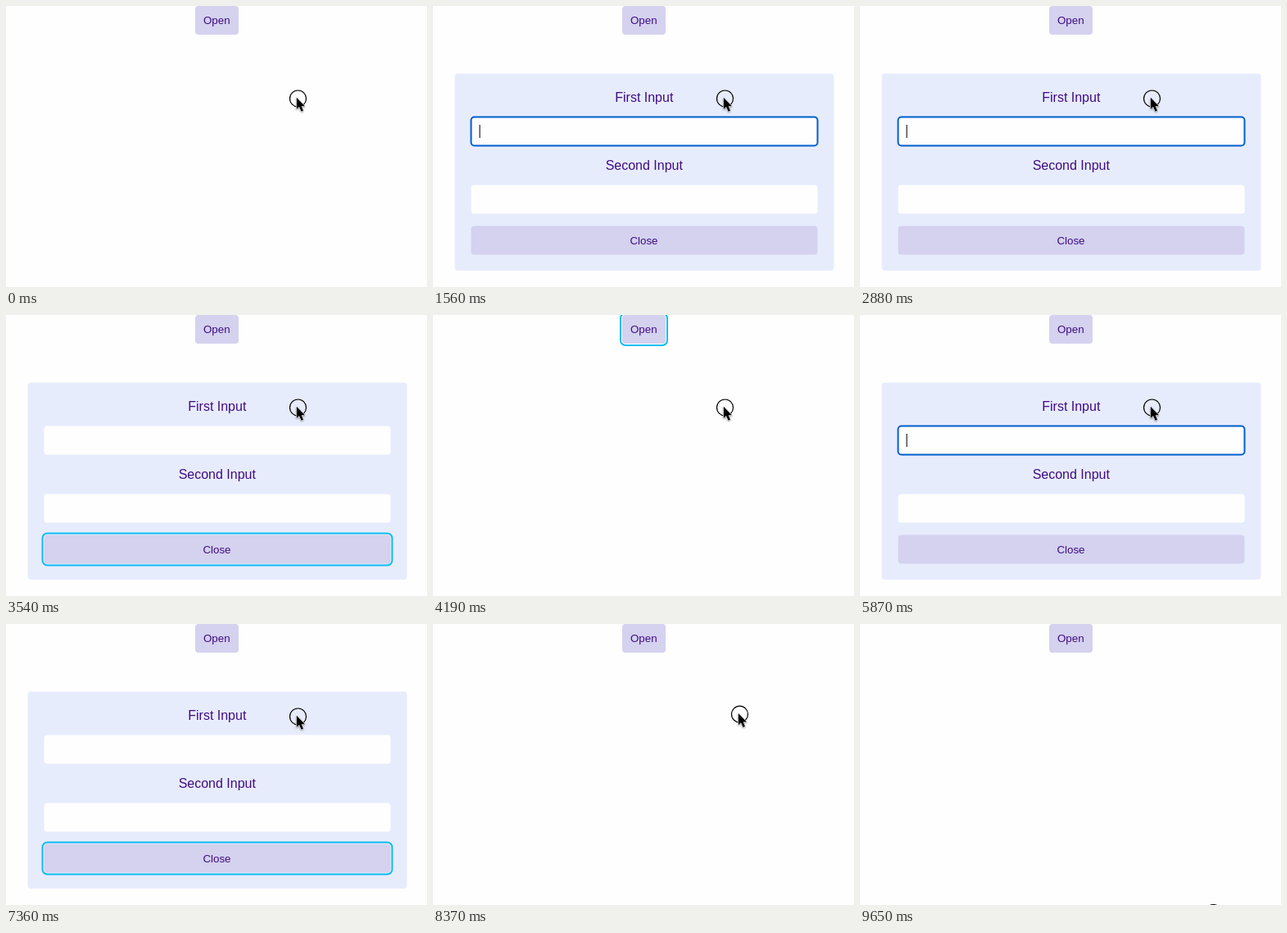
Animation, 514 px wide and 343 px high, one loop 9.8 s. Source, as an HTML page:

```html
<!DOCTYPE html>
<html lang="en">
<head>
<meta charset="utf-8">
<title>Dialog focus trap</title>
<style>
  html, body { margin: 0; width: 100%; height: 100%; overflow: hidden; background: #fefefe; }
  svg { display: block; width: 514px; height: 343px; }
  text { font: 13.333px "Liberation Sans", Arial, sans-serif; text-anchor: middle; fill: #400c82; }
  .label { font-size: 16px; }
  .button { fill: #d4d2ef; }
  .field { fill: #fefefe; }
  .ring { fill: none; stroke: #0dbdf2; stroke-width: 2; }
  .field-ring { stroke: #005fcc; }
  .arrow { stroke: #fff; stroke-width: 1; paint-order: stroke; filter: drop-shadow(0 1px 1px #0006); }
</style>
</head>
<body>
<svg viewBox="0 0 514 343">
  <rect class="button" x="231" y="0" width="53" height="35" rx="4"/>
  <text x="257.3" y="22">Open</text>
  <rect class="ring" id="open" x="229" y="-2" width="57" height="39" rx="6"/>

  <g id="panel">
    <rect x="26.5" y="82.5" width="463" height="240.5" rx="4" fill="#e7ecfd"/>
    <text class="label" x="257.8" y="117">First Input</text>
    <rect class="field" x="46.5" y="135.5" width="423" height="35" rx="4"/>
    <text class="label" x="257.8" y="200">Second Input</text>
    <rect class="field" x="46.5" y="218.5" width="423" height="35" rx="4"/>
    <rect class="button" x="46.5" y="268.5" width="423" height="35" rx="4"/>
    <text x="257.5" y="290.5">Close</text>
    <rect class="ring field-ring" id="first" x="46.5" y="135.5" width="423" height="35" rx="4"/>
    <rect class="ring field-ring" id="second" x="46.5" y="218.5" width="423" height="35" rx="4"/>
    <rect class="ring" id="close" x="44.5" y="266.5" width="427" height="39" rx="6"/>
    <rect id="caret" x="56.5" width="1.2" height="16" fill="#222"/>
  </g>

  <g id="cursor">
    <circle r="10" fill="none" stroke="#000" stroke-width="1.2"/>
    <path class="arrow" transform="translate(-1.7 -1.3)"
      d="M0 0V14.3L3.2 11.3L5.8 17L8.2 16L5.8 10.5H10.2Z"/>
  </g>
</svg>
<script>
const LOOP = 9800, BLINK = 475;
const $ = id => document.getElementById(id);
const show = (id, on) => $(id).setAttribute('visibility', on ? 'visible' : 'hidden');

// Time at which each element receives focus
const focusChanges = [
  [0, ''], [540, 'open'],
  [1560, 'first'], [2220, 'second'], [2520, 'close'],
  [2880, 'first'], [3180, 'second'], [3540, 'close'], [4190, 'open'],
  [5090, 'first'], [5450, 'second'], [5630, 'close'],
  [5870, 'first'], [6530, 'second'], [7360, 'close'], [7720, 'open'],
  [8320, '']
];
const caretTop = { first: 145, second: 228 };

// Each move follows a quadratic curve in discrete steps
const moves = [
  { start: 8320, end: 8720, steps: 7, path: [[356.5, 113], [427, 104], [392, 85]] },
  { start: 8900, end: 9070, steps: 4, path: [[392, 85], [401, 191], [410.5, 298]] },
  { start: 9240, end: 9650, steps: 8, path: [[410.5, 298], [421, 325.2], [431.5, 352.5]] }
];

function cursorAt(t) {
  const { start, end, steps, path: [a, b, c] } = moves.findLast(m => t >= m.start) || moves[0];
  const step = Math.floor((t - start) / (end - start) * (steps - 1) + 1e-6) + 1;
  const u = Math.min(Math.max(step / steps, 0), 1), v = 1 - u;
  return [0, 1].map(i => v * v * a[i] + 2 * u * v * b[i] + u * u * c[i]);
}

function render(t) {
  const [since, focus] = focusChanges.findLast(([time]) => t >= time);
  const panelOpen = !['', 'open'].includes(focus);
  show('panel', panelOpen);
  for (const id of ['open', 'first', 'second', 'close']) show(id, id === focus);
  show('caret', focus in caretTop && t - since < BLINK);
  $('caret').setAttribute('y', caretTop[focus] || 0);
  $('cursor').setAttribute('transform', `translate(${cursorAt(t)})`);
}

function tick() {
  render(performance.now() % LOOP);
  requestAnimationFrame(tick);
}
tick();
</script>
</body>
</html>
```
